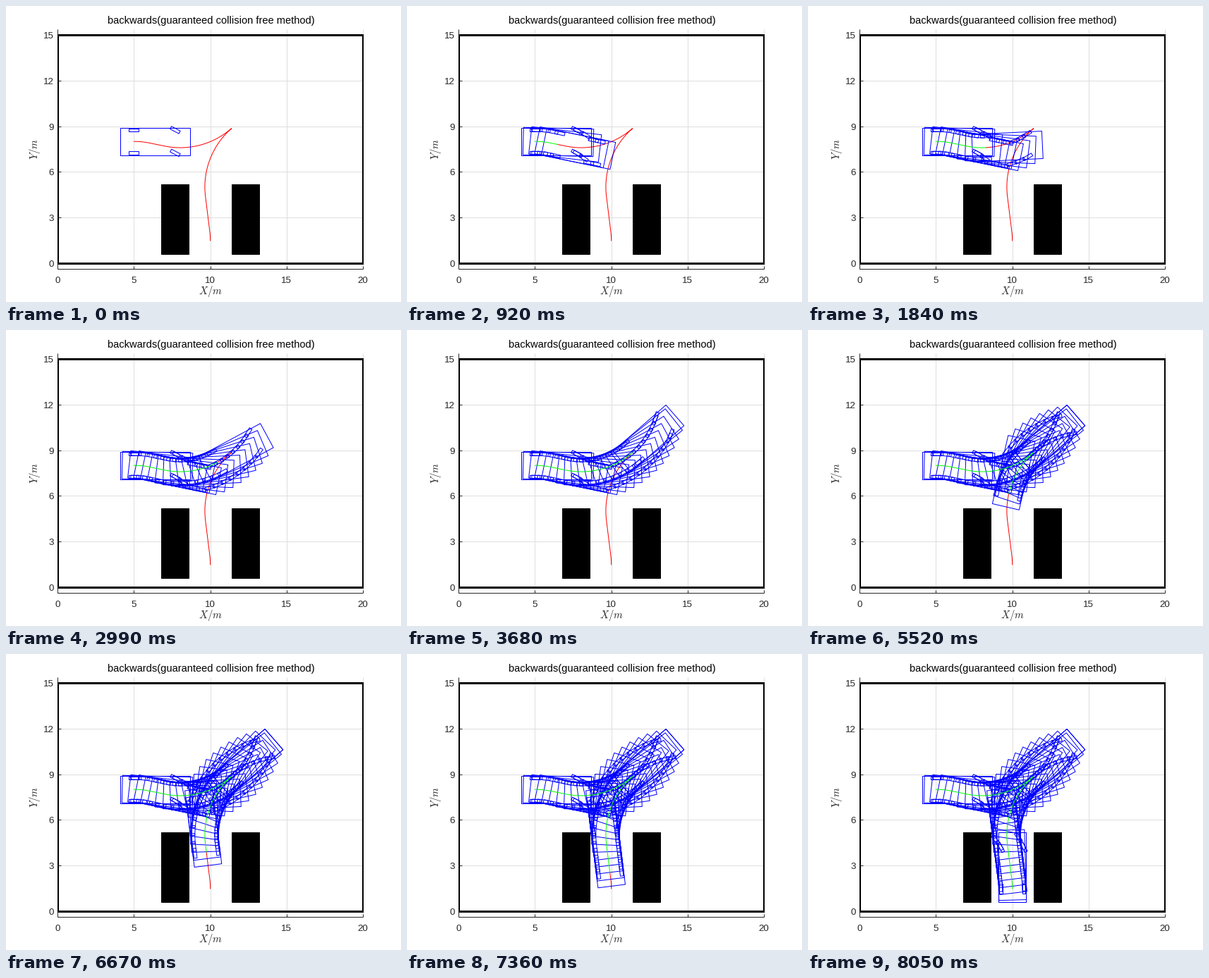
Write a matplotlib script that moves like this. It is 560x420 px and loops after 9.28 s.

```python
import numpy as np
import matplotlib.pyplot as plt
from matplotlib.animation import FuncAnimation
from matplotlib.collections import LineCollection
from matplotlib.patches import Rectangle
from matplotlib.transforms import Bbox

plt.rcParams["font.family"] = "Liberation Sans"
plt.rcParams["mathtext.fontset"] = "cm"

W, H, DPI = 560, 420, 100
INK = "#262626"
STEP_MS, LOOP_MS, TICK_MS = 230, 9280, 20

# Plot placement in pixels, measured from the lower left corner
SCALE, X0, Y0, MARGIN = 21.63, 73.3, 54.8, 8


def pt(px):
    return px * 72 / DPI


# Vehicle (metres): axle distance, overhangs, half width, wheels
BASE, REAR, FRONT, HALF = 2.7, 0.9, 3.7, 0.9
TRACK, WHEEL_L, WHEEL_W = 0.75, 0.65, 0.2

# Manoeuvre: arcs of one radius joined by straights, (length, curvature)
R = 5.1
A, TURN, B = np.radians([11.66, 41.16, 7.14])
AHEAD = [(R * A, -1 / R), (0.99, 0), (R * (A + TURN), 1 / R)]
BACK = [(R * (np.pi / 2 + B - TURN), -1 / R), (2.267, 0), (R * B, 1 / R)]
LEN_A = sum(seg[0] for seg in AHEAD)
LEN_B = sum(seg[0] for seg in BACK)
STRIDE, FIRST = 0.455, 0.13


def drive(pose, segs, way, dist):
    """Pose (x, y, heading, steering) after dist metres along segs."""
    x, y, th = pose[:3]
    k = 0
    for length, k in segs:
        go = min(dist, length)
        ds = way * go
        if k:
            new = th + k * ds
            x += (np.sin(new) - np.sin(th)) / k
            y -= (np.cos(new) - np.cos(th)) / k
            th = new
        else:
            x += ds * np.cos(th)
            y += ds * np.sin(th)
        if dist <= length:
            break
        dist -= go
    return x, y, th, np.arctan(k * BASE)


START = (5, 8, 0)
CUSP = drive(START, AHEAD, 1, LEN_A)


def ahead(s):
    return drive(START, AHEAD, 1, s)


def back(s):
    return drive(CUSP, BACK, -1, s)


def turned(points, angle, cx, cy):
    c, s = np.cos(angle), np.sin(angle)
    return points @ np.array([[c, s], [-s, c]]) + (cx, cy)


def box(x0, x1, y0, y1):
    return np.array([(x0, y0), (x1, y0), (x1, y1), (x0, y1), (x0, y0)])


def car(pose):
    x, y, th, steer = pose
    wheel = box(-WHEEL_L / 2, WHEEL_L / 2, -WHEEL_W / 2, WHEEL_W / 2)
    parts = [box(-REAR, FRONT, -HALF, HALF)]
    for axle, angle in ((0, 0), (BASE, steer)):
        for side in (-TRACK, TRACK):
            parts.append(turned(wheel, angle, axle, side))
    return [turned(p, th, x, y) for p in parts]


go_a = [0] + [FIRST + STRIDE * j for j in range(15)] + [LEN_A]
go_b = [STRIDE * j for j in range(18)] + [LEN_B]
poses = [ahead(s) for s in go_a] + [back(s) for s in go_b]
travelled = np.array(go_a + [LEN_A + s for s in go_b])
shapes = [part for pose in poses for part in car(pose)]

fine_a = np.linspace(0, LEN_A, 120)
fine_b = np.linspace(0, LEN_B, 140)
track = np.array([ahead(s)[:2] for s in fine_a] + [back(s)[:2] for s in fine_b])
track_s = np.concatenate([fine_a, LEN_A + fine_b])

fig = plt.figure(figsize=(W / DPI, H / DPI), dpi=DPI, facecolor="white")
ax = fig.add_axes([X0 / W, (Y0 - MARGIN) / H,
                   20 * SCALE / W, (15 * SCALE + 2 * MARGIN) / H])
low, high = -MARGIN / SCALE, 15 + MARGIN / SCALE
ax.set_xlim(0, 20)
ax.set_ylim(low, high)
ax.axis("off")


def rule(xs, ys, color, z):
    ax.plot(xs, ys, color=color, lw=pt(1), zorder=z, clip_on=False,
            solid_capstyle="butt")


def label(x, y, text, px, **kw):
    """Text placed in stage pixels, y measured downwards."""
    kw = {"color": INK, "ha": "center", "va": "baseline", **kw}
    fig.text(x / W, 1 - y / H, text, fontsize=pt(px), **kw)


tick = 4.3 / SCALE
for gx in range(0, 21, 5):
    rule([gx, gx], [low, high], "#dedede", 1)
    rule([gx, gx], [low, low + tick], INK, 3)
    label(X0 + gx * SCALE - 0.3, 393, str(gx), 13.33)
for gy in range(0, 16, 3):
    rule([0, 20], [gy, gy], "#dedede", 1)
    rule([0, tick], [gy, gy], INK, 3)
    label(67.8, H - Y0 - gy * SCALE + 5, str(gy), 13.33, ha="right")
rule([0, 20], [low, low], INK, 3)
rule([0, 0], [low, high], INK, 3)

# The wall is cut off at the sides of the plot
wall = ax.add_patch(Rectangle((0, 0), 20, 15, fill=False, ec="black",
                              lw=pt(3), zorder=4))
wall.set_clip_box(Bbox([[73, 0], [507, H]]))
for x in (6.8, 11.4):
    ax.add_patch(Rectangle((x, 0.6), 1.8, 4.6, fc="black", ec="black",
                           lw=pt(1), zorder=4))

label(290.7, 25, "backwards(guaranteed collision free method)", 14.67, color="black")
label(290, 405, "$X/m$", 14.67, va="center")
label(41.2, 203, "$Y/m$", 14.67, va="center", rotation=90)

ahead_line, = ax.plot([], [], color="red", lw=pt(1), zorder=5)
cars = LineCollection([], colors="blue", linewidths=pt(1), zorder=6)
ax.add_collection(cars, autolim=False)
done_line, = ax.plot([], [], color="#00ff00", lw=pt(1), zorder=7)


def show(step):
    cars.set_segments(shapes[:5 * (step + 1)])
    n = np.searchsorted(track_s, travelled[step])
    here = poses[step][:2]
    done_line.set_data(*np.vstack([track[:n], here]).T)
    ahead_line.set_data(*np.vstack([here, track[n:]]).T)
    return cars, done_line, ahead_line


def init():
    return show(0)


def update(n):
    step = (n * TICK_MS + TICK_MS // 2) // STEP_MS
    return show(min(step, len(poses) - 1))


anim = FuncAnimation(fig, update, frames=LOOP_MS // TICK_MS, init_func=init,
                     interval=TICK_MS, repeat=True, repeat_delay=0, blit=False)
plt.show()
```
